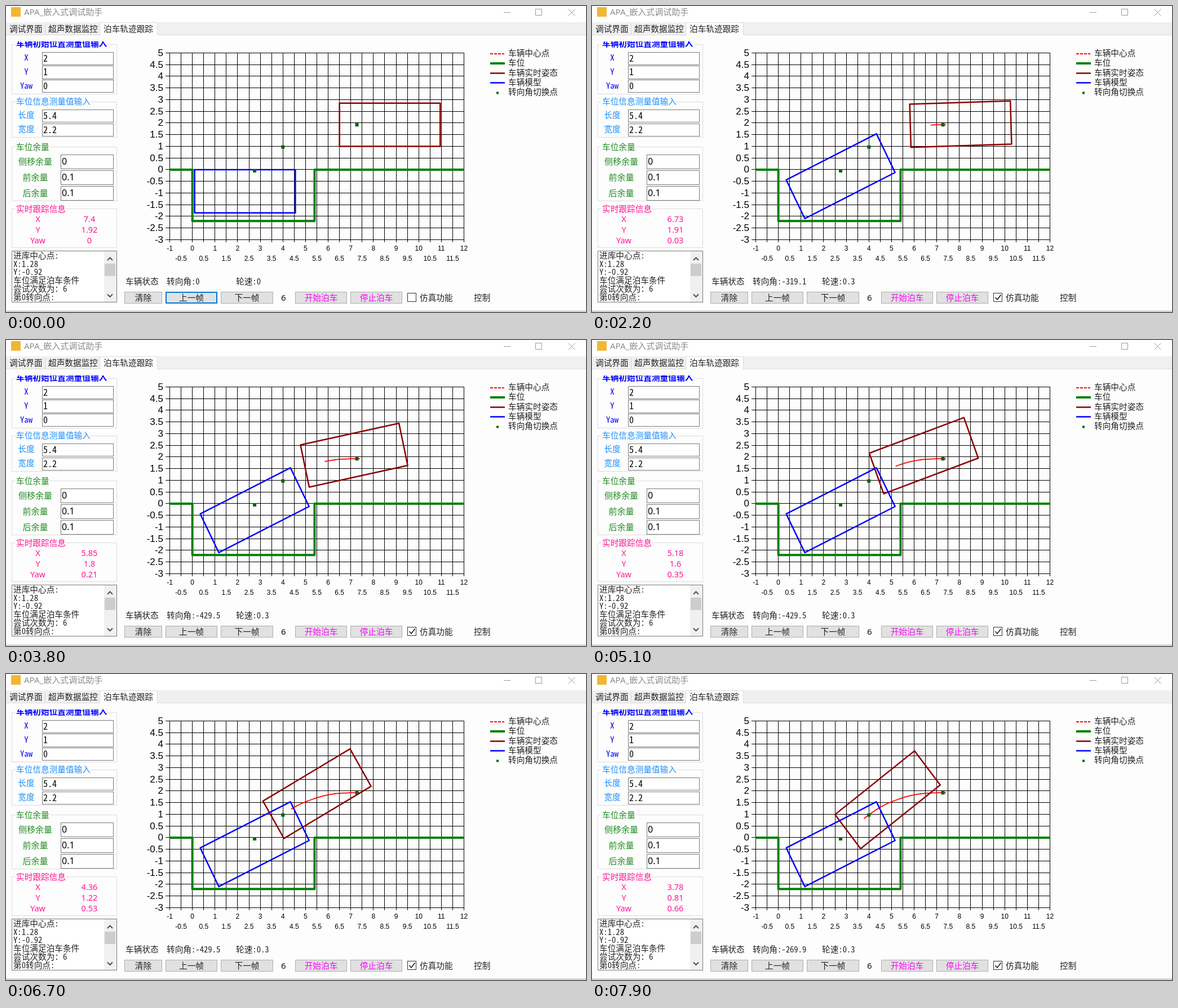
An HTML page for the animation above (8000 ms loop, 1029x544 px).

```html
<!DOCTYPE html>
<html lang="zh-CN">
<head>
<meta charset="utf-8">
<title>APA</title>
<style>
html, body { margin: 0; width: 100%; height: 100%; overflow: hidden; background: #fdfdfd; }
svg { display: block; width: 1029px; height: 544px; }
text { white-space: pre; }
.song { font: 14.67px "Noto Sans Mono CJK SC", "Noto Sans CJK SC", "Noto Sans CJK", monospace; font-weight: 300; }
.ui { font: 14.67px "Noto Sans", "Noto Sans CJK SC", "Noto Sans CJK", sans-serif; }
.axis { font: 17px "Liberation Sans", Arial, sans-serif; }
</style>
</head>
<body>
<svg id="stage" viewBox="0 0 1029 544" xmlns="http://www.w3.org/2000/svg"></svg>
<script>
const LOOP = 8000;
const stage = document.getElementById('stage');

function add(tag, attrs, label) {
  const el = document.createElementNS('http://www.w3.org/2000/svg', tag);
  for (const k in attrs) el.setAttribute(k, attrs[k]);
  if (label !== undefined) el.textContent = label;
  stage.append(el);
  return el;
}
const rect = (x, y, r, b, fill, stroke = 'none') =>
  add('rect', { x, y, width: r - x, height: b - y, fill, stroke });
const path = (d, stroke, width = 1, more = {}) =>
  add('path', { d, stroke, 'stroke-width': width, fill: 'none', ...more });
const text = (label, x, y, cls = 'song', fill = '#222', size = 14.67, anchor = 'start', weight = '') =>
  add('text', {
    x, y, class: cls, fill, 'text-anchor': anchor,
    style: `font-size:${size}px;${weight && 'font-weight:' + weight}`
  }, label);

// Window frame and tabs
rect(0, 0, 1029, 29, '#fff');
rect(9, 2, 26, 19, '#f2b632');
text('APA_嵌入式调试助手', 32, 16, 'ui', '#8c8c8c', 15);
path('M883 11.5H895M939.5 5.5h11v11h-11zM997.5 5.5l12 12M1009.5 5.5l-12 12', '#999');
rect(0, 29, 1029, 51, '#f0f0f0');
path('M0 51.5H1029', '#dcdcdc');
path('M69.5 32V51', '#d9d9d9');
rect(166.5, 29.5, 268.5, 53, '#fdfdfd', '#dcdcdc');
rect(166, 52, 270, 55, '#fdfdfd');
text('调试界面', 6, 46, 'ui');
text('超声数据监控', 75, 46, 'ui');
text('泊车轨迹跟踪', 173, 45.5, 'ui');
rect(0, 541, 1029, 544, '#f0f0f0');
path('M0 542.5H1029', '#b7a6c4');

// Side panel
function group(title, top, bottom, width, base, color, cls = 'song', weight = '') {
  rect(10.5, top + .5, 196.5, bottom + .5, 'none', '#dcdcdc');
  rect(16, top - 1, 18 + width, top + 2, '#fdfdfd');
  return text(title, 18, base, cls, color, 14.67, 'start', weight);
}
function field(label, cx, base, color, left, top, bottom, value, cls = 'song') {
  text(label, cx, base, cls, color, cls === 'ui' ? 15 : 14.67, 'middle');
  rect(left + .5, top + .5, 190.5, bottom - .5, '#fff', '#7a7a7a');
  text(value, left + 2, (top + bottom) / 2 + 5, cls, '#000', 16, 'start', 400);
}
const blue = '#0000ff', sky = '#1e90ff', leaf = '#228b22', pink = '#ff1493';
group('车辆初始位置测量值输入', 68, 156, 162, 72, blue, 'song', 700);
rect(12, 54, 196, 63, '#fdfdfd');
field('X', 36, 97, blue, 64, 82, 105, '2');
field('Y', 36, 122, blue, 64, 106, 130, '1');
field('Yaw', 36, 147, blue, 64, 131, 154, '0');
group('车位信息测量值输入', 170, 233, 132, 174.5, sky);
field('长度', 36, 199, sky, 64, 184, 207, '5.4');
field('宽度', 36, 224, sky, 64, 209, 232, '2.2');
group('车位余量', 250, 346, 60, 256, leaf, 'ui');
field('侧移余量', 52, 282, leaf, 97, 264, 290, '0', 'ui');
field('前余量', 52, 310, leaf, 97, 292, 318, '0.1', 'ui');
field('后余量', 52, 338, leaf, 97, 320, 346, '0.1', 'ui');
group('实时跟踪信息', 360, 429, 88, 365.5, pink);
const readouts = ['X', 'Y', 'Yaw'].map((name, i) => {
  text(name, 56.5, 384 + i * 19, 'ui', pink, 14.5, 'middle');
  return text('', 148, 384 + i * 19, 'ui', pink, 14.5, 'middle');
});

// Log
rect(10.5, 435.5, 196.5, 526.5, '#fff', '#7a7a7a');
['进库中心点:', 'X:1.28', 'Y:-0.92', '车位满足泊车条件', '尝试次数为：6', '第0转向点:']
  .forEach((line, i) => text(line, 13, 449 + i * 14.7));
rect(174, 436, 196, 526, '#f0f0f0');
rect(175, 458, 194, 480, '#cdcdcd');
path('M180 452l4.5-4.5 4.5 4.5M180 512.5l4.5 4.5 4.5-4.5', '#505050', 2);

// Status row and buttons
text('车辆状态', 212, 495);
const steerText = text('', 285, 495);
const speedText = text('', 408, 495);
function button(label, left, right, color = '#222') {
  rect(left + .5, 508.5, right - .5, 528.5, '#e1e1e1', '#adadad');
  text(label, (left + right) / 2, 524, 'song', color, 14.67, 'middle');
  const focus = add('rect', {
    x: left + 1, y: 509, width: right - left - 2, height: 19,
    fill: 'none', stroke: '#0078d7', 'stroke-width': 2
  });
  focus.style.visibility = 'hidden';
  return focus;
}
button('清除', 210, 277);
const prevFocus = button('上一帧', 283, 375);
const nextFocus = button('下一帧', 381, 474);
text('6', 488, 524, 'ui', '#111', 15);
button('开始泊车', 513, 605, '#ff00ff');
button('停止泊车', 611, 703, '#ff00ff');
rect(712.5, 510.5, 727.5, 525.5, '#fff', '#333');
const tick = path('M715.5 518l3.5 4 6.5-8.5', '#222', 1.7);
text('仿真功能', 734, 523.5);
text('控制', 830, 523.5);

// Chart
const px = x => 330.65 + x * 40.15;
const py = y => 290.9 - y * 41.5;
const crisp = v => Math.floor(v) + .5;
const line = pts => 'M' + pts.map(([x, y]) => px(x).toFixed(2) + ' ' + py(y).toFixed(2)).join('L');
let grid = '';
for (let x = -1; x <= 12; x += .5) {
  const whole = Number.isInteger(x);
  grid += `M${crisp(px(x))} 83V420`;
  text(x, px(x), whole ? 435 : 453, 'axis', '#000', 12, 'middle');
}
for (let y = -3; y <= 5; y += .5) {
  grid += `M283 ${crisp(py(y))}H812.5`;
  text(y, 279, py(y) + 5.5, 'axis', '#000', 17, 'end');
}
path(grid, '#000');

const trail = path('', '#f00', 1.8);
path(line([[-1, 0], [0, 0], [0, -2.2], [5.4, -2.2], [5.4, 0], [12.02, 0]]), '#008000', 4, { 'stroke-linejoin': 'round' });
const car = path('', '#8b0000', 2.5, { 'stroke-linejoin': 'round' });
const model = path('', blue, 2.5, { 'stroke-linejoin': 'round' });
[[7.27, 1.92], [4, .97], [2.75, -.05]].forEach(([x, y]) =>
  rect(px(x) - 3, py(y) - 3, px(x) + 3, py(y) + 3, '#006400'));

// Legend
path('M859 85H884', '#f00', 2, { 'stroke-dasharray': '5 2' });
path('M859 102H885', '#008000', 4);
path('M859 119.5H885', '#8b0000', 2.5);
path('M859 136.5H885', blue, 2.5);
rect(870, 152.5, 874, 156.5, '#006400');
['车辆中心点', '车位', '车辆实时姿态', '车辆模型', '转向角切换点']
  .forEach((label, i) => text(label, 891, 89 + i * 17.3));

// Poses are x, y, yaw of the rear axle
const START = [7.4, 1.92, 0];
const GO = 1400;
const drive = [
  [1400, 7.18, 1.92, 0],
  [1800, 6.96, 1.92, .01],
  [2200, 6.73, 1.91, .03],
  [2600, 6.51, 1.9, .075],
  [3800, 5.85, 1.8, .21],
  [5100, 5.18, 1.6, .35],
  [6000, 4.73, 1.42, .44],
  [7300, 4.06, 1.02, .6],
  [7900, 3.78, .81, .66]
];
// Forward and backward tries inside the slot, one every 200 ms
const tries = [
  [1, -.925, 0],
  [1.656, -.88, .137],
  [1.189, -.968, .236],
  [1.644, -.83, .336],
  [1.475, -.91, .374],
  [1.69, -.808, .428],
  [1.565, -.87, .46]
];

function outline([x, y, yaw]) {
  const c = Math.cos(yaw), s = Math.sin(yaw);
  const corners = [[-.9, .925], [3.55, .925], [3.55, -.925], [-.9, -.925]];
  return line(corners.map(([u, v]) => [x + u * c - v * s, y + u * s + v * c])) + 'Z';
}

// Hermite curve whose tangents follow the heading
function pose(t) {
  if (t < GO) return START;
  let i = 0;
  while (i < drive.length - 2 && t >= drive[i + 1][0]) i++;
  const [t0, x0, y0, a0] = drive[i], [t1, x1, y1, a1] = drive[i + 1];
  const u = Math.min(1, (t - t0) / (t1 - t0));
  const len = Math.hypot(x1 - x0, y1 - y0);
  const h = u * u * (3 - 2 * u), m0 = u * (1 - u) ** 2, m1 = u * u * (u - 1);
  const mix = (p, q, f) => p + (q - p) * h - len * (f(a0) * m0 + f(a1) * m1);
  return [mix(x0, x1, Math.cos), mix(y0, y1, Math.sin), a0 + (a1 - a0) * u];
}

function steering(t) {
  if (t < GO) return 0;
  if (t > 7400) return -429.5 + 31.92 * (t - 7400) / 100;
  return Math.max(-429.5, -31.91 * ((t - GO) / 100 + 2));
}

const show = (el, on) => { el.style.visibility = on ? 'visible' : 'hidden'; };
let shown = -1;

function draw(now) {
  const t = Math.floor((now % LOOP) / 100) * 100;
  if (t === shown) return;
  shown = t;
  const p = pose(t), moving = t >= GO;
  const track = [START];
  for (let k = GO; k <= t; k += 100) track.push(pose(k));
  trail.setAttribute('d', moving ? line(track) : '');
  car.setAttribute('d', outline(p));
  model.setAttribute('d', outline(tries[Math.min(6, Math.floor(t / 200))]));
  readouts.forEach((el, i) => { el.textContent = +p[i].toFixed(2); });
  steerText.textContent = '转向角:' + +steering(t).toFixed(1);
  speedText.textContent = '轮速:' + (moving ? .3 : 0);
  show(tick, moving);
  show(prevFocus, t < 200);
  show(nextFocus, t >= 200 && !moving);
}

const began = performance.now();
function loop() {
  draw(performance.now() - began);
  requestAnimationFrame(loop);
}
loop();
</script>
</body>
</html>
```
